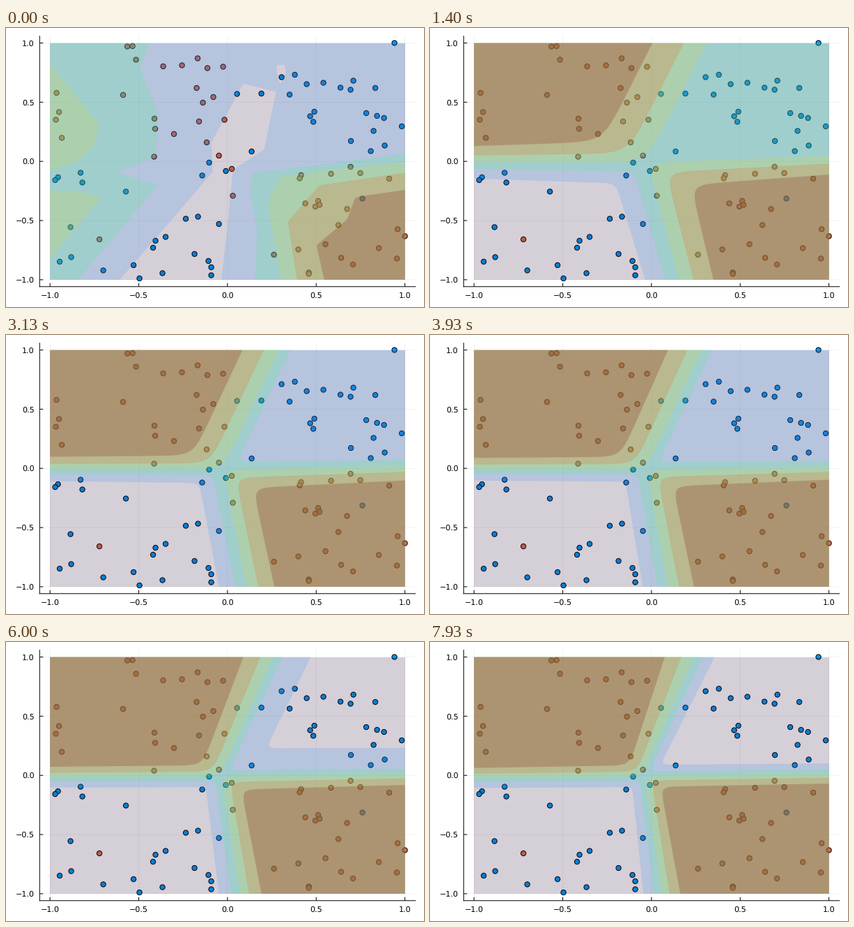
Animation, 600 px wide and 400 px high, one loop 8000 ms. Source, as a matplotlib script:

```python
import numpy as np
import matplotlib.pyplot as plt
from matplotlib.animation import FuncAnimation
from matplotlib.collections import PatchCollection
from matplotlib.patches import Circle, Rectangle
from matplotlib.path import Path

W, H, DPI = 600, 400, 100
PT = 72 / DPI
FRAMES, LOOP = 120, 8000
X0, X1, Y0, Y1 = 63.6, 573.1, 22.0, 361.4      # the unit square in pixels
CX, CY, UX, UY = 318.3, 191.7, 254.7, 169.7    # origin and pixels per unit
LEFT, RIGHT, TOP, BOTTOM = 48.7, 588.6, 11.6, 371.3

# Samples of the two classes
BLUE = [
    (558, 22), (415, 67.5), (396, 71), (499, 76), (456, 79), (432, 81),
    (480.5, 86), (530.5, 86.5), (495, 89), (332, 95), (367, 94.5),
    (407.5, 96), (517.5, 122.5), (443, 120.5), (437, 127), (533, 126.5),
    (543, 129.5), (441.5, 135), (568.5, 141.5), (528, 148), (495.5, 162.5),
    (544, 169), (353, 177.5), (524, 177), (292, 193.5), (316, 205.5),
    (282, 212), (107.5, 208), (75, 214.5), (71, 218.5), (110, 222),
    (172.5, 235), (276, 271), (258.5, 274), (306, 281.5), (93, 286),
    (215, 305.5), (229.5, 300), (211.5, 315.5), (271, 324.5), (291, 334.5),
    (295, 343.5), (295, 355), (225, 352), (192, 359.5), (183.5, 340.5),
    (140, 348), (94, 329), (77.5, 335.5), (512, 245)]
ORANGE = [
    (174.5, 27), (182, 26.5), (187, 46), (226, 55.5), (253, 54), (275.5, 44),
    (289.5, 58), (312, 56), (274, 86.5), (298, 99.5), (283, 107.5),
    (168.5, 96.5), (73, 93.5), (76.5, 121), (72, 132), (80.5, 158),
    (213.5, 130.5), (214.5, 145), (241.5, 152.5), (277.5, 134.5), (314, 132),
    (288.5, 164.5), (213, 185), (306, 183.5), (324.5, 202.5), (326, 241),
    (424, 211.5), (422, 216), (467, 209.5), (495, 199.5), (509, 208.5),
    (550.5, 216.5), (430, 252), (448.5, 248.5), (444.5, 256.5), (450.5, 254),
    (490, 260), (477.5, 283), (562.5, 289), (573, 299), (385, 325.5),
    (420, 318), (459, 310.5), (481.5, 330), (535.5, 316), (561.5, 331),
    (498.5, 339.5), (435, 351), (435, 353), (134.5, 303.5)]

# The classes are parted by a cross of four arms, each a bundle of five level
# lines: (outer centre, outer spacing, inner centre, inner spacing).
# Training slows down, so the arms follow a parabola in log time.
KEYS = np.log1p([4, 35, 119])
ARMS = {
    "top": [(390, 70, 311, 58), (395, 25, 325, 25), (378, 17, 317, 11)],
    "bottom": [(387, 26, 320, 37), (350, 18, 317, 18), (333, 11, 312, 8.5)],
    "left": [(201, 18, 194, 30), (192.5, 8, 193, 9.5), (195.5, 6, 193, 6.5)],
    "right": [(166, 17, 184, 21), (187, 9.5, 193, 12.5), (189, 6, 192, 6.5)],
}
ENDS = {"top": (Y0, 165), "bottom": (Y1, 215), "left": (X0, 290), "right": (X1, 345)}
FITS = {arm: np.polyfit(KEYS, rows, 2) for arm, rows in ARMS.items()}
OFFSET = {1: -2.4, 2: -1, 3: 0, 4: 1, 5: 2.4}  # place of a level in its bundle
ONSET = {1: 4.57, 2: 3.55}                     # log time when a level fills the top right

# Untrained state: rough outlines per level
VALLEY = [(120, 440), (164, 361), (297, 207), (295, 165), (341, 80), (388, 92),
          (371, 175), (326, 204), (318, 290), (300, 440)]
ISLE = [(388, 54), (401, 53), (402, 65), (393, 84)]
WEST = [(225, -60), (206, 22), (193, 57), (219, 125), (215, 185), (160, 208),
        (218, 226), (40, 437), (-40, 440), (-40, -60)]
WEST_HI = [(-28, -60), (134, 138), (128, 168), (104, 191), (-40, 242)]
WEST_LO = [(-40, 231), (100, 234), (138, 242), (-40, 456)]
EAST = {
    2: [(680, 167), (400, 203), (355, 208), (351, 235), (361, 290), (355, 440)],
    3: [(680, 182), (445, 206), (394, 214), (380, 240), (378, 265), (410, 440)],
    4: [(680, 192), (450, 226), (405, 278), (430, 440)],
    5: [(680, 217), (502, 243), (490, 275), (446, 312), (475, 440)],
}

xs, ys = np.linspace(X0, X1, 121), np.linspace(Y0, Y1, 121)
gx, gy = np.meshgrid(xs, ys)
grid = np.column_stack([gx.ravel(), gy.ravel()])


def depth(points):
    """Signed distance to a polygon, positive inside."""
    ring = np.array(points + points[:1], float)
    dist = np.full(len(grid), np.inf)
    for a, b in zip(ring[:-1], ring[1:]):
        d = b - a
        t = np.clip((grid - a) @ d / (d @ d), 0, 1)
        dist = np.minimum(dist, np.hypot(*(grid - a - t[:, None] * d).T))
    return np.where(Path(ring).contains_points(grid), dist, -dist).reshape(gx.shape)


def untrained(level):
    if level == 1:
        return -np.maximum(depth(VALLEY), depth(ISLE))
    shapes = [EAST[level] + [(680, 440)]]
    shapes += {2: [WEST], 3: [WEST_HI, WEST_LO]}.get(level, [])
    return np.max([depth(s) for s in shapes], axis=0)


def beyond(arm, u, q):
    """Distance right of (or below) the line at offset q in an arm's bundle."""
    c_out, s_out, c_in, s_in = np.polyval(FITS[arm], u)
    a, b = ENDS[arm]
    along, across = (gy, gx) if arm in ("top", "bottom") else (gx, gy)
    start = c_out + q * s_out
    slope = (c_in + q * s_in - start) / (b - a)
    return (across - start - slope * (along - a)) / np.hypot(1, slope)


def corner(d1, d2, r):
    """Inside of two half planes with a rounded corner."""
    return -r * np.logaddexp(-d1 / r, -d2 / r)


def trained(level, u):
    """Field of a level, which is filled where the field is positive."""
    q = OFFSET[level]
    bend = {arm: 3 + 0.3 * np.polyval(FITS[arm], u)[3] for arm in ("top", "bottom")}
    left, bottom = beyond("left", u, -q), beyond("bottom", u, q)
    right = beyond("right", u, q)
    if level >= 3:
        return np.maximum(corner(-beyond("top", u, -q), -left, bend["top"]),
                          corner(bottom, right, bend["bottom"]))
    top = beyond("top", u, -0.75 * q)
    wait = 350 * max(0, ONSET[level] - u)
    return -np.maximum(corner(-bottom, left, bend["bottom"] / 2),
                       corner(top, -right, bend["top"] / 2) - wait)


START = {level: untrained(level) for level in OFFSET}


def field_at(level, u):
    field = trained(level, max(u, KEYS[0]))
    if u < KEYS[0]:
        w = u / KEYS[0]
        field = (1 - w) * START[level].clip(-80, 80) + w * field.clip(-80, 80)
    return field


plt.rcParams["text.hinting"] = "none"
fig = plt.figure(figsize=(W / DPI, H / DPI), dpi=DPI, facecolor="white")
ax = fig.add_axes([0, 0, 1, 1])
ax.set_xlim(0.4, W + 0.4)
ax.set_ylim(H + 0.5, 0.5)
ax.set_axis_off()
ax.set_autoscale_on(False)


def line(x, y, width=1, **style):
    ax.plot(x, y, color="black", lw=width * PT, solid_capstyle="butt",
            snap=False, **style)


for v in np.linspace(-1, 1, 5):
    px, py = CX + v * UX, CY - v * UY
    text = f"{v:.1f}".replace("-", "\u2212")
    line([px, px], [TOP, BOTTOM], 0.5, alpha=0.1, zorder=1)
    line([LEFT, RIGHT], [py, py], 0.5, alpha=0.1, zorder=1)
    line([px, px], [BOTTOM, BOTTOM - 5], zorder=2)
    line([LEFT, LEFT + 5], [py, py], zorder=2)
    font = dict(family="DejaVu Sans", size=8, color="black", va="baseline")
    ax.text(px, 387.5, text, ha="center", **font)
    ax.text(40.9, py + 4, text, ha="right", **font)
line([LEFT, LEFT], [TOP, BOTTOM + 0.5], zorder=2)
line([LEFT - 0.5, RIGHT], [BOTTOM, BOTTOM], zorder=2)

for dots, color in ((BLUE, "#009AFA"), (ORANGE, "#E36F47")):
    ax.add_collection(PatchCollection([Circle(p, 3.65) for p in dots], facecolor=color,
                                      edgecolor="black", linewidth=PT, zorder=3))

# Translucent layers pile up, one more for each level reached
turbo = plt.get_cmap("turbo")
ax.add_patch(Rectangle((X0, Y0), X1 - X0, Y1 - Y0, color=turbo(0.0),
                       alpha=0.2, lw=0, zorder=4))
layers = []


def draw(n):
    while layers:
        layers.pop().remove()
    for level in OFFSET:
        field = field_at(level, np.log1p(n))
        layers.append(ax.contourf(xs, ys, field, levels=[0, 5000],
                                  colors=[turbo(level / 5)], alpha=0.2,
                                  antialiased=True, zorder=4 + level))
    return []


anim = FuncAnimation(fig, draw, frames=FRAMES, interval=LOOP / FRAMES,
                     init_func=lambda: [], repeat=True, repeat_delay=0)
plt.show()
```
